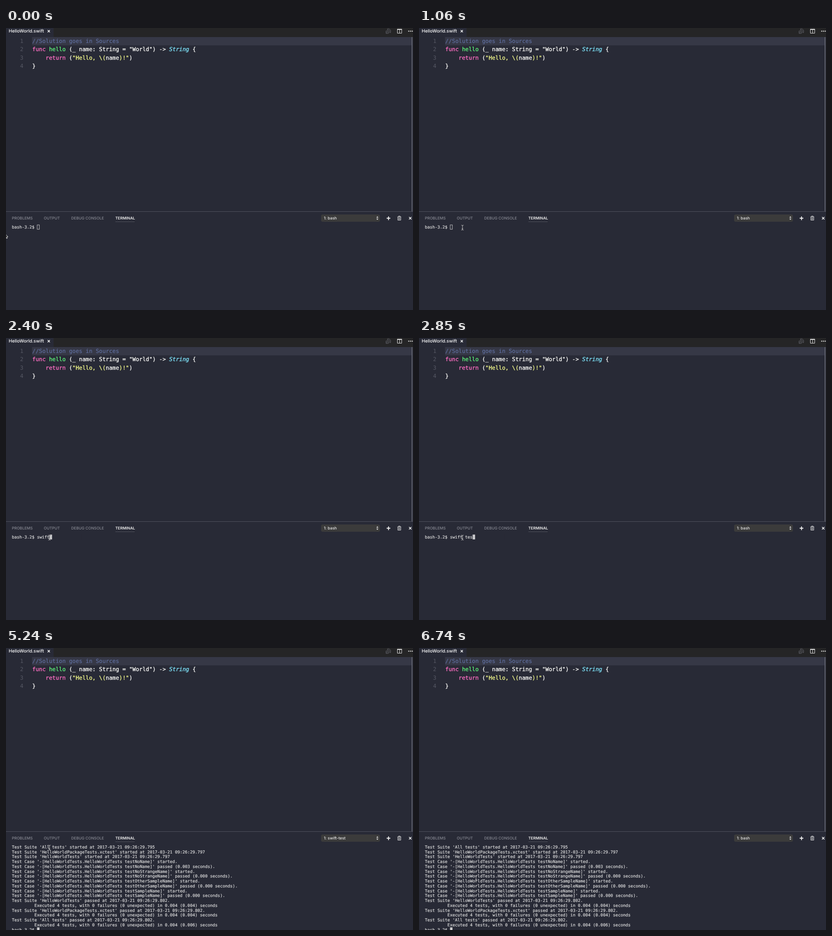
An HTML page that plays this animation: 899 px wide and 623 px high, repeating every 8 s.

```html
<!DOCTYPE html>
<html lang="en">
<head>
<meta charset="utf-8">
<title>Swift test run</title>
<style>
  :root { --ch: 5.547px; --bg: #282a36; }
  html, body { margin: 0; width: 100%; height: 100%; overflow: hidden; background: var(--bg); }
  svg { display: block; width: 100vw; height: 100vh; text-rendering: geometricPrecision; }
  text { fill: currentColor; white-space: pre; }
  .mono { font-family: "DejaVu Sans Mono", monospace; stroke: currentColor; }
  .code { font-size: 12.25px; color: #fbfbf8; stroke-width: .35; }
  .term { font-size: 9.214px; color: #dcdcdc; stroke-width: .22; }
  .ui { font-family: Inter, sans-serif; font-size: 8.45px; font-weight: 500; color: #878993; }
  .bright { color: #f0f0f0; font-weight: 600; }
  .num { color: #565864; stroke-width: 0; text-anchor: end; }
  .comment { color: #6272a4; stroke-width: .12; }
  .key { color: #ff6fc4; }
  .name { color: #5ff77c; }
  .str { color: #f5fb8c; }
  .type { color: #7fe6fd; font-style: italic; }

  .anim { animation: 8s step-end infinite; }
  .caret { animation-name: caret; }
  .hollow { animation-name: hollow; }
  .solid { animation-name: solid; }
  .typing { animation-name: typing; }
  .log { animation-name: log; }
  .hover { animation-name: hover; }
  .bash { animation-name: bash; }
  .swift { animation-name: swift; }
  .suffix { animation-name: suffix; }
  .arrow { animation-name: arrow; }
  .hand { animation-name: hand; }
  .beam { animation-name: beam; }

  @keyframes caret {
    0% { translate: 0 0; }
    18.875% { translate: var(--ch) 0; }
    20.75% { translate: calc(2 * var(--ch)) 0; }
    26.25% { translate: calc(3 * var(--ch)) 0; }
    28.125% { translate: calc(4 * var(--ch)) 0; }
    30% { translate: calc(5 * var(--ch)) 0; }
    31.875% { translate: calc(7 * var(--ch)) 0; }
    33.75% { translate: calc(8 * var(--ch)) 0; }
    35.625% { translate: calc(9 * var(--ch)) 0; }
    37.5% { translate: calc(10 * var(--ch)) 0; }
    39.375% { translate: calc(-10 * var(--ch)) 10.74px; }
    65.5%, to { translate: 0 182.58px; }
  }
  @keyframes hollow { 0% { opacity: 1; } 15.125%, to { opacity: 0; } }
  @keyframes solid { 0% { opacity: 0; } 15.125%, to { opacity: 1; } }
  @keyframes typing { 0% { opacity: 1; } 65.5%, to { opacity: 0; } }
  @keyframes log { 0% { opacity: 0; } 65.5%, to { opacity: 1; } }
  @keyframes hover { 0% { color: #878993; } 7.75% { color: #f0f0f0; } 11.375%, to { color: #878993; } }
  @keyframes bash { 0% { opacity: 1; } 41.25% { opacity: 0; } 67.375%, to { opacity: 1; } }
  @keyframes swift { 0% { opacity: 0; } 41.25% { opacity: 1; } 67.375%, to { opacity: 0; } }
  @keyframes suffix { 0% { fill-opacity: 0; } 43.125%, to { fill-opacity: 1; } }
  @keyframes arrow { 0% { opacity: 1; } 1.75%, to { opacity: 0; } }
  @keyframes hand {
    0% { opacity: 0; translate: 104px 425px; }
    7.75% { opacity: 1; translate: 104px 425px; }
    9.625% { opacity: 1; translate: 100px 430px; }
    11.375%, to { opacity: 0; translate: 100px 430px; }
  }
  @keyframes beam {
    0% { opacity: 0; translate: 25px 447px; }
    5.875% { opacity: 1; translate: 25px 447px; }
    7.75% { opacity: 0; translate: 25px 447px; }
    11.375% { opacity: 1; translate: 96px 440px; }
    13.25% { opacity: 1; translate: 96px 441px; }
    80.5% { opacity: 1; translate: 115px 487px; }
    82.375% { opacity: 1; translate: 124px 510px; }
    84.25%, to { opacity: 1; translate: 126px 509px; }
  }
</style>
</head>
<body>
<svg viewBox="0 0 899 623" preserveAspectRatio="none">
  <rect width="899" height="623" fill="#282a36"/>

  <!-- Tab bar -->
  <rect x="105" width="794" height="20" fill="#252526"/>
  <text class="ui" x="6" y="10.3" style="font-size:9.95px;color:#fff">HelloWorld.swift</text>
  <path d="M92 4.6l5 5m0-5l-5 5" stroke="#fff" stroke-width="1.4"/>
  <g fill="none" stroke="#62636b" stroke-width="1">
    <path d="M842.5 4.5v-2.500h4l3 3v5h-3M841.500 6.500h-2v5.500h5v-2"/>
    <circle cx="844.8" cy="6.800" r="2.200"/>
    <path d="M843 8.500l-2.500 2.500"/>
  </g>
  <path d="M864.500 3h9.500v8.500h-9.500zM869.250 3v8.500" fill="none" stroke="#e4e4e4"/>
  <path d="M864 3h10.500" stroke="#e4e4e4" stroke-width="2"/>
  <g fill="#e4e4e4">
    <circle cx="889.500" cy="7" r="1.200"/><circle cx="893.300" cy="7" r="1.200"/><circle cx="897.100" cy="7" r="1.200"/>
  </g>

  <!-- Editor -->
  <rect x="57.500" y="20" width="839" height="18.300" fill="#363846"/>
  <rect x="896" y="20" width="1.500" height="385" fill="#70727d"/>
  <g class="mono code" xml:space="preserve">
    <text class="num" x="38.300" y="33">1</text>
    <text class="num" x="38.300" y="51.300">2</text>
    <text class="num" x="38.300" y="69.600">3</text>
    <text class="num" x="38.300" y="87.900">4</text>
    <text class="comment" x="58" y="33">//Solution goes in Sources</text>
    <text x="58" y="51.300"><tspan class="key">func</tspan> <tspan class="name">hello</tspan> (_ name: String = "World") -&gt; <tspan class="type">String</tspan> {</text>
    <text x="58" y="69.600">    <tspan class="key">return</tspan> (<tspan class="str">"Hello, \(</tspan>name<tspan class="str">)!"</tspan>)</text>
    <text x="58" y="87.900">}</text>
  </g>

  <!-- Panel header -->
  <rect y="405" width="899" height="1" fill="#50525d"/>
  <g class="ui">
    <text x="13" y="423">PROBLEMS</text>
    <text class="anim hover" x="83.500" y="423">OUTPUT</text>
    <text x="144" y="423">DEBUG CONSOLE</text>
    <text class="bright" x="241.500" y="423">TERMINAL</text>
  </g>
  <rect x="241.500" y="427.500" width="42.500" height="1" fill="#50525d"/>
  <rect x="696" y="412" width="130" height="16" rx="3.500" fill="#3b3b3b"/>
  <g class="ui" style="font-size:8.7px;color:#ececec">
    <text class="anim bash" x="702" y="423">1: bash</text>
    <text class="anim swift" x="702" y="423">1: swift<tspan class="anim suffix">-test</tspan></text>
  </g>
  <path d="M818 419l2.300-3 2.300 3zM818 421l2.300 3 2.300-3z" fill="#e4e4e4"/>
  <path d="M840.800 420.300h8.200M844.900 416.200v8.200" stroke="#f0f0f0" stroke-width="1.900"/>
  <path d="M864.500 417.200h8.500M867 417v-1.500h3.500v1.500M865.500 418v6.500h6.500v-6.500M867.700 418.500v5M869.800 418.500v5" fill="none" stroke="#dedede"/>
  <path d="M890.200 417.500l5.400 5.400m0-5.400l-5.400 5.400" stroke="#f0f0f0" stroke-width="1.500"/>

  <!-- Terminal -->
  <text class="mono term anim typing" x="13" y="443" xml:space="preserve">bash-3.2$ swift test</text>
  <g class="anim caret">
    <rect x="68.200" y="434.300" width="70" height="11" fill="#282a36"/>
    <rect class="anim hollow" x="68.900" y="435" width="4.800" height="9.700" fill="none" stroke="#cfcfd1" stroke-width=".9"/>
    <rect class="anim solid" x="68.500" y="434.300" width="5.500" height="10.700" fill="#c9c9cc"/>
  </g>
  <g id="log" class="mono term anim log"></g>

  <!-- Pointers -->
  <path class="anim arrow" d="M-2.500 454.500V464L-.2 462 1.400 465 3 464.300 1.600 461.200H4.400Z" fill="#111" stroke="#fff" stroke-width=".9"/>
  <path class="anim hand" d="M2.500 1.300Q3.500 0 4.500 1.300L5 4.500 8.300 5.200Q9.700 5.700 9.500 7.500L8.700 11.700H4.200L1 8Q.3 6.700 1.600 6.500L3.200 7.500Z" fill="#fff" stroke="#15161c" stroke-width=".7"/>
  <g class="anim beam" fill="none">
    <path d="M-2.500-5.500Q0-5.500 0-4V4Q0 5.500-2.500 5.500M2.500-5.500Q0-5.500 0-4M0 4Q0 5.500 2.500 5.500M-1.500 2.500H1.500" stroke="#15161c" stroke-width="1.800" opacity=".6"/>
    <path d="M-2.500-5.500Q0-5.500 0-4V4Q0 5.500-2.500 5.500M2.500-5.500Q0-5.500 0-4M0 4Q0 5.500 2.500 5.500M-1.500 2.500H1.500" stroke="#e2e2e4" stroke-width=".9"/>
  </g>
</svg>
<script>
  const stamp = ms => `2017-03-21 09:26:29.${ms}`;
  const suite = (name, event) => `Test Suite '${name}' ${event}`;
  const testCase = (name, secs) => {
    const label = `Test Case '-[HelloWorldTests.HelloWorldTests test${name}]'`;
    return [`${label} started.`, `${label} passed (${secs} seconds).`];
  };
  const finish = (name, secs) => [
    suite(name, `passed at ${stamp(802)}.`),
    `${" ".repeat(9)}Executed 4 tests, with 0 failures (0 unexpected) in 0.004 (${secs}) seconds`
  ];

  const lines = [
    suite("All tests", `started at ${stamp(795)}`),
    suite("HelloWorldPackageTests.xctest", `started at ${stamp(797)}`),
    suite("HelloWorldTests", `started at ${stamp(797)}`),
    ...testCase("NoName", "0.003"),
    ...testCase("NoStrangeName", "0.000"),
    ...testCase("OtherSampleName", "0.000"),
    ...testCase("SampleName", "0.000"),
    ...finish("HelloWorldTests", "0.004"),
    ...finish("HelloWorldPackageTests.xctest", "0.004"),
    ...finish("All tests", "0.006"),
    "bash-3.2$"
  ];

  const log = document.getElementById("log");
  lines.forEach((line, row) => {
    const text = document.createElementNS(log.namespaceURI, "text");
    text.setAttribute("x", 13);
    text.setAttribute("y", 443 + row * 10.74);
    text.textContent = line;
    log.append(text);
  });
</script>
</body>
</html>
```
